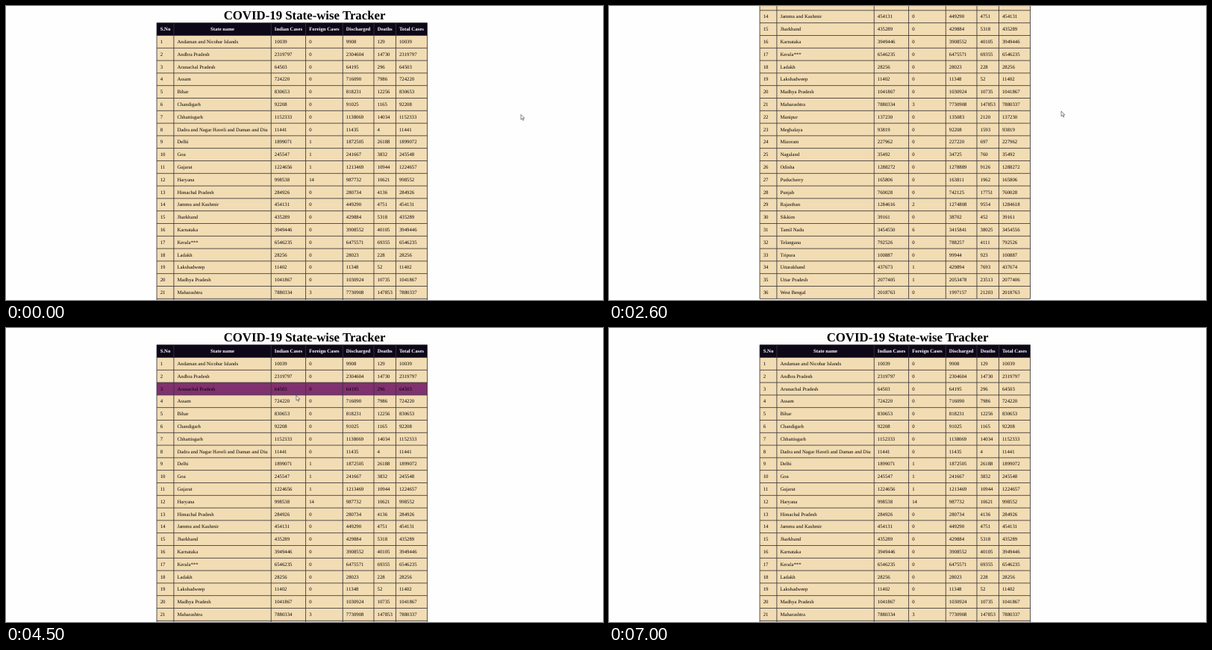
These frames come from a looping animation (800 by 394 pixels, 7.1 s). An HTML page with a canvas:

```html
<!DOCTYPE html>
<html lang="en">
<head>
<meta charset="utf-8">
<title>State-wise Tracker</title>
<style>
html, body { margin: 0; width: 100%; height: 100%; overflow: hidden; background: #fefefe; }
canvas { display: block; }
</style>
</head>
<body>
<canvas id="stage" width="800" height="394"></canvas>
<script>
const ctx = document.getElementById('stage').getContext('2d');
const LOOP = 7100, STEP = 100;

// The page is laid out in its own pixels and shown reduced.
const SCALE = 0.42, LEFT = 481, HEAD_TOP = 54, ROW = 40, PAD = 11, BORDER = 2;
const BODY_TOP = HEAD_TOP + ROW, MAX_SCROLL = 600;
const FAMILY = '"Liberation Serif", "Times New Roman", serif';
const TITLE = `bold 40px ${FAMILY}`, BOLD = `bold 16px ${FAMILY}`, PLAIN = `16px ${FAMILY}`;
const HEADINGS = ['S.No', 'State name', 'Indian Cases', 'Foreign Cases', 'Discharged', 'Deaths', 'Total Cases'];

// state, Indian cases, deaths, foreign cases (if any)
const STATES = `Andaman and Nicobar Islands,10039,129
Andhra Pradesh,2319797,14730
Arunachal Pradesh,64503,296
Assam,724220,7986
Bihar,830653,12256
Chandigarh,92208,1165
Chhattisgarh,1152333,14034
Dadra and Nagar Haveli and Daman and Diu,11441,4
Delhi,1899071,26188,1
Goa,245547,3832,1
Gujarat,1224656,10944,1
Haryana,998538,10621,14
Himachal Pradesh,284926,4136
Jammu and Kashmir,454131,4751
Jharkhand,435289,5318
Karnataka,3949446,40105
Kerala***,6546235,69355
Ladakh,28256,228
Lakshadweep,11402,52
Madhya Pradesh,1041867,10735
Maharashtra,7880334,147853,3
Manipur,137230,2120
Meghalaya,93819,1593
Mizoram,227962,697
Nagaland,35492,760
Odisha,1288272,9126
Puducherry,165806,1962
Punjab,760028,17751
Rajasthan,1284616,9554,2
Sikkim,39161,452
Tamil Nadu,3454550,38025,6
Telangana,792526,4111
Tripura,100887,923
Uttarakhand,437673,7693,1
Uttar Pradesh,2077405,23513,1
West Bengal,2018763,21203`;

const rows = STATES.split('\n').map((line, i) => {
  const [name, indian, deaths, foreign = 0] = line.split(',');
  const total = +indian + +foreign;
  const active = Math.floor(total * 0.0002);
  return [i + 1, name, indian, foreign, total - deaths - active, deaths, total];
});
const BODY_BOTTOM = BODY_TOP + rows.length * ROW;

function widthOf(str, font) {
  ctx.font = font;
  return ctx.measureText(str).width;
}

// Each column is as wide as its longest entry plus padding.
ctx.textRendering = 'geometricPrecision';
const edges = [LEFT];
HEADINGS.forEach((label, c) => {
  const widest = Math.max(widthOf(label, BOLD), ...rows.map(row => widthOf(row[c], PLAIN)));
  edges.push(edges[c] + widest + 2 * PAD);
});
const RIGHT = edges[HEADINGS.length];

const mix = (a, b, p) => a + (b - a) * p;
const ramp = (t, from, to) => Math.min(1, Math.max(0, (t - from) / (to - from)));
const smooth = (t, from, to) => {
  const p = ramp(t, from, to);
  return p * p * (3 - 2 * p);
};
const easeOut = (t, from, to) => 1 - (1 - ramp(t, from, to)) ** 2;

function scrollAt(t) {
  return MAX_SCROLL * (easeOut(t, 1600, 2295) - easeOut(t, 3080, 3775));
}

// The pointer rests beside the table, or sweeps up and down over its rows.
function pointerAt(t) {
  const shift = smooth(t, 2700, 3200);
  const rest = t < 1000 ? [690, 145.5] : [mix(606, 599, shift), mix(141, 161, shift)];
  const phase = 0.725 + (t - 4500) * 0.00763;
  const sweep = [389 + (t - 4500) / 325, 217 - 169 * Math.cos(phase)];
  const over = smooth(t, 50, 500) - smooth(t, 1450, 1750) + smooth(t, 3700, 4050);
  const [x, y] = rest.map((v, i) => mix(v, sweep[i], over));
  return [x, mix(y, 440, smooth(t, 6450, 6800))];
}

// The highlight trails the pointer slightly.
function hoveredRow(t) {
  const [x, y] = pointerAt(t - 17).map(v => v / SCALE);
  if (x < LEFT || x > RIGHT || y * SCALE > 394) return -1;
  return Math.floor((y + scrollAt(t) - BODY_TOP) / ROW);
}

function text(str, x, y, font, color, align = 'left') {
  ctx.font = font;
  ctx.fillStyle = color;
  ctx.textAlign = align;
  ctx.fillText(str, x, y);
}

function box(x, y, w, h, color) {
  ctx.fillStyle = color;
  ctx.fillRect(x, y, w, h);
}

function drawPage(hovered) {
  const width = RIGHT - LEFT, line = '#38363a';
  text('COVID-19 State-wise Tracker', 952.5, 43, TITLE, '#000', 'center');
  box(LEFT, BODY_TOP, width, BODY_BOTTOM - BODY_TOP, '#f2dcb3');
  box(LEFT, HEAD_TOP, width, ROW, '#0d0718');
  if (rows[hovered]) box(LEFT, BODY_TOP + hovered * ROW, width, ROW, '#80316f');

  for (const x of edges) box(x - BORDER / 2, HEAD_TOP, BORDER, BODY_BOTTOM - HEAD_TOP, line);
  for (let y = HEAD_TOP; y <= BODY_BOTTOM; y += ROW) box(LEFT, y - BORDER / 2, width, BORDER, line);

  HEADINGS.forEach((label, c) =>
    text(label, (edges[c] + edges[c + 1]) / 2, HEAD_TOP + 25, BOLD, '#fff', 'center'));
  rows.forEach((row, r) => row.forEach((cell, c) =>
    text(cell, edges[c] + PAD, BODY_TOP + r * ROW + 25, PLAIN, '#000')));
}

const arrow = new Path2D('M0 0V16L4 12.5L6.5 18.5L9 17.5L6.5 11.5H11.5Z');

function drawPointer([x, y]) {
  ctx.translate(x / SCALE, y / SCALE);
  ctx.fillStyle = '#fff';
  ctx.fill(arrow);
  ctx.strokeStyle = '#222';
  ctx.lineWidth = 1.3;
  ctx.stroke(arrow);
}

function draw(now) {
  const t = Math.floor((now % LOOP) / STEP) * STEP;
  box(0, 0, 800, 394, '#fefefe');
  ctx.save();
  ctx.scale(SCALE, SCALE);
  ctx.save();
  ctx.translate(0, -scrollAt(t));
  drawPage(hoveredRow(t));
  ctx.restore();
  drawPointer(pointerAt(t));
  ctx.restore();
}

const start = performance.now();
function tick() {
  draw(performance.now() - start);
  requestAnimationFrame(tick);
}
tick();
</script>
</body>
</html>
```
